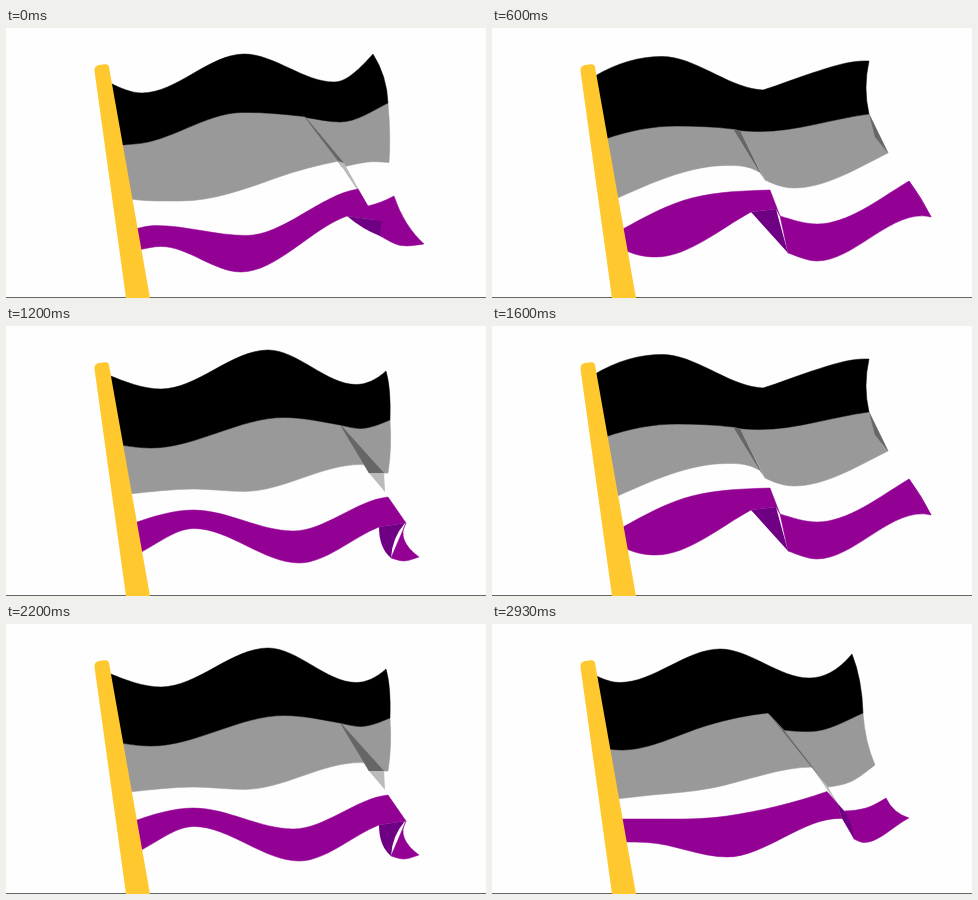
Animation, 480 px wide and 270 px high, one loop 2990 ms. Source, as an HTML page with a canvas:

```html
<!DOCTYPE html>
<html lang="en">
<head>
<meta charset="utf-8">
<title>Waving flag</title>
<style>
html, body { margin: 0; width: 100%; height: 100%; overflow: hidden; background: #fefefe; }
canvas { display: block; width: 480px; height: 270px; }
</style>
</head>
<body>
<canvas id="stage" width="480" height="270"></canvas>
<script>
const ctx = document.getElementById('stage').getContext('2d');
const LOOP = 2990, WAVE = 1000, STEPS = 15;
const GRAY = '#999', SHADE = '#666', PALE = '#bbb', PURPLE = '#920094', DEEP = '#700083';

// An edge runs from the pole to the free end: [y, slope] at the pole, then
// [x, y, slope] for trough, crest, fold front, fold back, trough, end.
const poleX = y => 101 + (y - 42) * 0.1754;

function edge(list) {
  const pts = list.map(([x, y, s = 0]) => [x, y, s]);
  const [y, s] = list[0];
  pts[0] = [poleX(y), y, s];
  if (pts.length === 5) pts.splice(3, 0, pts[3], pts[3]);
  if (!list[1].length) pts[1] = pts[0];
  return pts;
}

// rim: bend of the three free sides. fold: gray strip (left, right, tip),
// then the purple underside (corner and two bends).
const pose = (edges, rim, fold) => ({ edges: edges.map(edge), rim, folds: [fold] });

const high = pose([
  [[54.5, .5], [136, 65], [238, 26], [328, 54], [367, 26, -1.1]],
  [[117, 0], [128, 116, -.05], [235, 84.5, -.02], [298, 88.5, .12], [300, 89.5, .15], [334, 94], [382, 75, -.5]],
  [[171, .15], [175, 173], [270, 150, -.36], [333, 133, -.2], [336, 139, -.2], [362, 134, -.12], [383, 134.5, .05]],
  [[201, -.25], [150, 197.5], [240, 207.5], [352, 161, -.15], [362, 178, -.25], [375, 174, -.38], [388, 168, -.5]],
  [[222, -.2], [155, 218.5], [235, 244], [341, 188, -.35], [374, 208, .5], [395, 217.5, .15], [418, 216, -.15]]
], [[381, 48], [385, 110], [398, 198]],
  [[332, 133], [338, 135], [362, 178], [376, 193], [374, 201], [356, 201]]);

const curl = pose([
  [[49, .4], [155, 63], [262, 24], [350, 58.5], [380, 45, -.9]],
  [[119, .15], [145, 122], [278, 91.5], [334, 99, .18], [335, 99.3, .18], [354, 102.5], [384, 94, -.4]],
  [[168, -.1], [188, 163], [238, 165.5], [362, 139, .1], [363, 147], [372, 147.3], [382, 147]],
  [[197, -.35], [188, 184], [287, 205], [382, 171, -.1], [400, 197], [400, 197], [400, 197]],
  [[227, -.5], [188, 202.5], [293, 237], [373, 201, -.4], [385, 232, .3], [398, 235], [413, 231, -.3]]
], [[385, 62], [386, 122], [390, 214]],
  [[363, 147], [378, 147], [379, 166], [399, 197], [386, 212], [373, 222]]);

const wide = pose([
  [[48.5, -.6], [], [170, 28.5], [266, 61.5, .12], [271, 62, -.3], [320, 45, -.32], [377, 33, .05]],
  [[111, -.35], [], [185, 98], [241, 101, .12], [248, 102.5, .12], [268, 103.5], [377, 86, -.13]],
  [[171, -.45], [], [235, 137.5], [267, 144, .6], [273, 152, .5], [302, 160], [396, 125, -.5]],
  [[202, -.55], [], [200, 170, -.25], [278, 162, -.03], [288, 188, .3], [325, 196], [417, 153, -.6]],
  [[222, .5], [], [164, 229], [259, 184, -.55], [296, 225, .35], [325, 233], [439, 189, .25]]
], [[371, 60], [384, 108], [430, 170]],
  [[266, 142], [271, 149], [273, 153], [284, 181], [288, 196], [277, 204]]);

const crease = pose([
  [[51, .5], [128, 58.5], [228, 25], [317, 54], [360, 30, -1.2]],
  [[125, .1], [130, 126], [215, 101.5, -.3], [276, 89, -.1], [292, 106, .15], [318, 107.5], [371, 89, -.45]],
  [[175, -.1], [160, 171, -.1], [220, 164, -.2], [322, 143], [336, 163, -.1], [358, 158, -.4], [383, 141, -.75]],
  [[195, 0], [165, 195], [235, 192, -.15], [335, 167.5, -.35], [352, 187, -.05], [374, 184, -.3], [394, 174, -.6]],
  [[218, 0], [155, 218.5, .05], [235, 233], [350, 194.5, .05], [362, 215, .5], [372, 218.5], [417, 194, -.5]]
], [[370, 55], [373, 118], [401, 189]],
  [[321, 145], [336, 163], [350, 187], [345, 180], [360, 192], [356, 205]]);

// A new wave enters at the pole while the old one runs out at the free end.
const xy = p => p.slice(0, 2);
const flat = (a, b) => [a, a, a, b, b, b].map(xy);
const entering = {
  edges: curl.edges.map(([h, u, ...rest]) => [h, h, h, u, u, u, ...rest]),
  rim: curl.rim,
  folds: [flat(curl.edges[2][1], curl.edges[4][1]), curl.folds[0]]
};
const tip = wide.edges[4][6];
const leaving = {
  edges: wide.edges.map(e => [...e, ...Array(4).fill(e[6])]),
  rim: wide.rim,
  folds: [wide.folds[0], [[396, 125], [383, 109], [396, 125], ...Array(3).fill(xy(tip))]]
};

const spans = [
  [0, 3, high, curl],
  [3, 9, entering, leaving],
  [9, 14, wide, crease],
  [14, 15, crease, high]
];

function mix(a, b, k) {
  if (typeof a === 'number') return a + (b - a) * k;
  if (Array.isArray(a)) return a.map((v, i) => mix(v, b[i], k));
  return Object.fromEntries(Object.keys(a).map(key => [key, mix(a[key], b[key], k)]));
}

const go = p => ctx.lineTo(p[0], p[1]);
const bend = (c, p) => ctx.quadraticCurveTo(c[0], c[1], p[0], p[1]);

// Follows an edge between two indices, either way; folds are straight.
function follow(pts, from, to, cuts) {
  const dir = Math.sign(to - from);
  go(pts[from]);
  for (let i = from; i !== to; i += dir) {
    const [x0, y0, s0] = pts[i], [x1, y1, s1] = pts[i + dir];
    const d = (x1 - x0) / 3;
    if (cuts.includes(Math.min(i, i + dir))) ctx.lineTo(x1, y1);
    else ctx.bezierCurveTo(x0 + d, y0 + s0 * d, x1 - d, y1 - s1 * d, x1, y1);
  }
}

function shape(color, trace, seam) {
  ctx.beginPath();
  trace();
  ctx.closePath();
  ctx.fillStyle = ctx.strokeStyle = color;
  ctx.fill();
  if (seam) ctx.stroke();
}

function drawFlag({ edges, rim, folds }) {
  const [top, a, b, c, d] = edges;
  const last = top.length - 1;
  const cuts = folds.map((_, i) => 3 + 4 * i);

  function panels(color, up, low, side, join) {
    for (let i = folds.length; i >= 0; i--) {
      const from = i ? cuts[i - 1] + 1 : 0;
      const to = i < folds.length ? cuts[i] : last;
      shape(color, () => {
        follow(up, from, to, cuts);
        if (to === last) bend(side, low[last]);
        else if (join) join(i);
        follow(low, to, from, cuts);
      }, true);
    }
  }

  panels(GRAY, a, b, rim[1]);
  shape('#000', () => {
    follow(top, 0, last, cuts);
    bend(rim[0], a[last]);
    follow(a, last, 0, cuts);
  }, true);
  folds.forEach(([left, right, end], i) => {
    const n = cuts[i];
    shape(PALE, () => [left, right, end].forEach(go));
    shape(SHADE, () => [a[n], a[n + 1], right, left].forEach(go));
  });
  panels(PURPLE, c, d, rim[2], i => {
    go(c[cuts[i] + 1]);
    go(folds[i][3]);
  });
  folds.forEach(([, , , corner, inner, outer], i) => {
    const n = cuts[i];
    shape(DEEP, () => {
      go(d[n]);
      go(corner);
      bend(inner, d[n + 1]);
      bend(outer, d[n]);
    });
  });
}

function drawPole() {
  shape('#fec82e', () => {
    ctx.moveTo(120, 270);
    ctx.lineTo(88.5, 43);
    ctx.quadraticCurveTo(88, 38, 93, 37);
    ctx.lineTo(99, 36.3);
    ctx.quadraticCurveTo(102.5, 36, 103, 39);
    ctx.lineTo(144, 270);
  });
}

function draw(ms) {
  let step = Math.floor(((ms % LOOP) + 4) / (WAVE / STEPS)) % STEPS;
  if (step === 12) step = 11; // one drawing is held twice as long
  const [from, to, start, end] = spans.find(s => step <= s[1]);
  ctx.fillStyle = '#fefefe';
  ctx.fillRect(0, 0, 480, 270);
  ctx.fillStyle = '#666';
  ctx.fillRect(0, 269, 480, 1);
  ctx.lineWidth = 0.5;
  ctx.lineJoin = 'round';
  drawFlag(mix(start, end, (step - from) / (to - from)));
  drawPole();
}

const begin = performance.now();
function tick() {
  draw(performance.now() - begin);
  requestAnimationFrame(tick);
}
tick();
</script>
</body>
</html>
```
